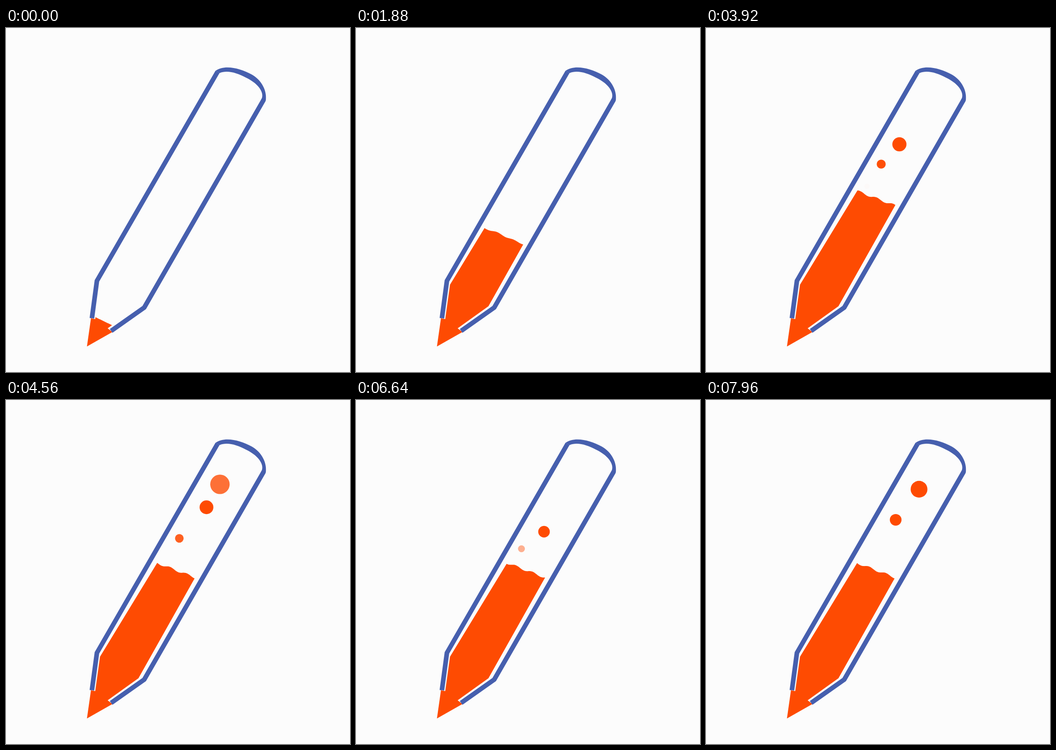
These frames come from a looping animation (748x748 px, 8000 ms). An HTML page with a canvas:

```html
<!DOCTYPE html>
<html lang="en">
<head>
<meta charset="utf-8">
<title>Filling pencil</title>
<style>
  html, body { margin: 0; width: 100%; height: 100%; overflow: hidden; background: #fcfcfc; }
  canvas { display: block; width: 100%; height: 100%; }
</style>
</head>
<body>
<canvas width="748" height="748"></canvas>
<script>
const ctx = document.querySelector('canvas').getContext('2d');
const LOOP = 8000, STEP = 40, RISE = 3000, BUBBLE_CYCLE = 3000;
const BLUE = '#465fae', ORANGE = '#fe4b02', PAPER = '#fcfcfc';

const body = new Path2D('M176 692.5 184.8 631 194 633 204.5 558 327 357 420 205 513 205 288 605 221 653 231.5 661Z');
const walls = new Path2D('M186.8 631.2 197.7 549.8 460 95.3M560.3 156 300.6 607.8 228.6 658.6');
const cap = new Path2D('M455.8 93C475 79 509 87 535 101.5C557 114.5 567.5 137 565 157L563.5 160 554.5 156.5C560 148 557 138 550 129C543 120 533 113.5 522 108C502 97.5 481 91 464.5 98Z');

// pace bends the rise in time, bend shapes the sideways drift
const bubbles = [
  { start: 220, life: 1720, pace: .83, x: 405, y: 350, bend: 2, grow: 2 },
  { start: 420, life: 2040, pace: 1, x: 350, y: 345, bend: .75, grow: 0 },
  { start: 880, life: 2000, pace: 1.4, x: 350, y: 345, bend: .75, grow: 0 }
];
const exit = { x: 478, y: 145 };

const clamp = v => Math.min(1, Math.max(0, v));
const smooth = v => (v = clamp(v), v * v * (3 - 2 * v));
const easeSine = v => (1 - Math.cos(Math.PI * clamp(v))) / 2;
const mix = (a, b, k) => a + (b - a) * k;
const wave = (x, start, length) => Math.sin(2 * Math.PI * (x - start) / length);

function drawLiquid(t) {
  const level = easeSine(t / RISE);
  const cx = mix(212.5, 370.5, level), cy = mix(637.5, 370.5, level);
  const slope = mix(.486, .385, clamp(t / 2500));
  const ripple = smooth((t - 1000) / 1600);
  const swell = 2 * clamp(t / 1000) * (1 - ripple);
  const drift = 386 - .0217 * (t - 2800);

  ctx.save();
  ctx.clip(body);
  ctx.beginPath();
  ctx.moveTo(150, 748);
  for (let x = 150; x <= 520; x++) {
    ctx.lineTo(x, cy + slope * (x - cx)
      - swell * wave(x, cx - 35, 80)
      - 2.4 * ripple * wave(x, drift, 36));
  }
  ctx.lineTo(520, 748);
  ctx.fill();
  ctx.restore();
}

function drawBubbles(t) {
  if (t < BUBBLE_CYCLE) return;
  for (const b of bubbles) {
    const age = (t % BUBBLE_CYCLE - b.start) / b.life;
    if (age <= 0 || age >= 1) continue;
    const p = age ** b.pace;
    const x = mix(b.x, exit.x, smooth(p) ** b.bend);
    const y = mix(b.y, exit.y, p);
    ctx.globalAlpha = clamp(p * 4) * clamp((1 - p) * 4.2);
    ctx.beginPath();
    ctx.arc(x, y, 20.4 - .083 * (y - 168) + b.grow, 0, 2 * Math.PI);
    ctx.fill();
  }
  ctx.globalAlpha = 1;
}

function draw(t) {
  ctx.fillStyle = PAPER;
  ctx.fillRect(0, 0, 748, 748);
  ctx.fillStyle = ORANGE;
  drawLiquid(t);
  drawBubbles(t);
  ctx.strokeStyle = ctx.fillStyle = BLUE;
  ctx.lineWidth = 10.1;
  ctx.stroke(walls);
  ctx.fill(cap);
}

let start;
function tick(now) {
  start ??= now;
  draw(Math.floor((now - start) % LOOP / STEP) * STEP);
  requestAnimationFrame(tick);
}
draw(0);
requestAnimationFrame(tick);
</script>
</body>
</html>
```
